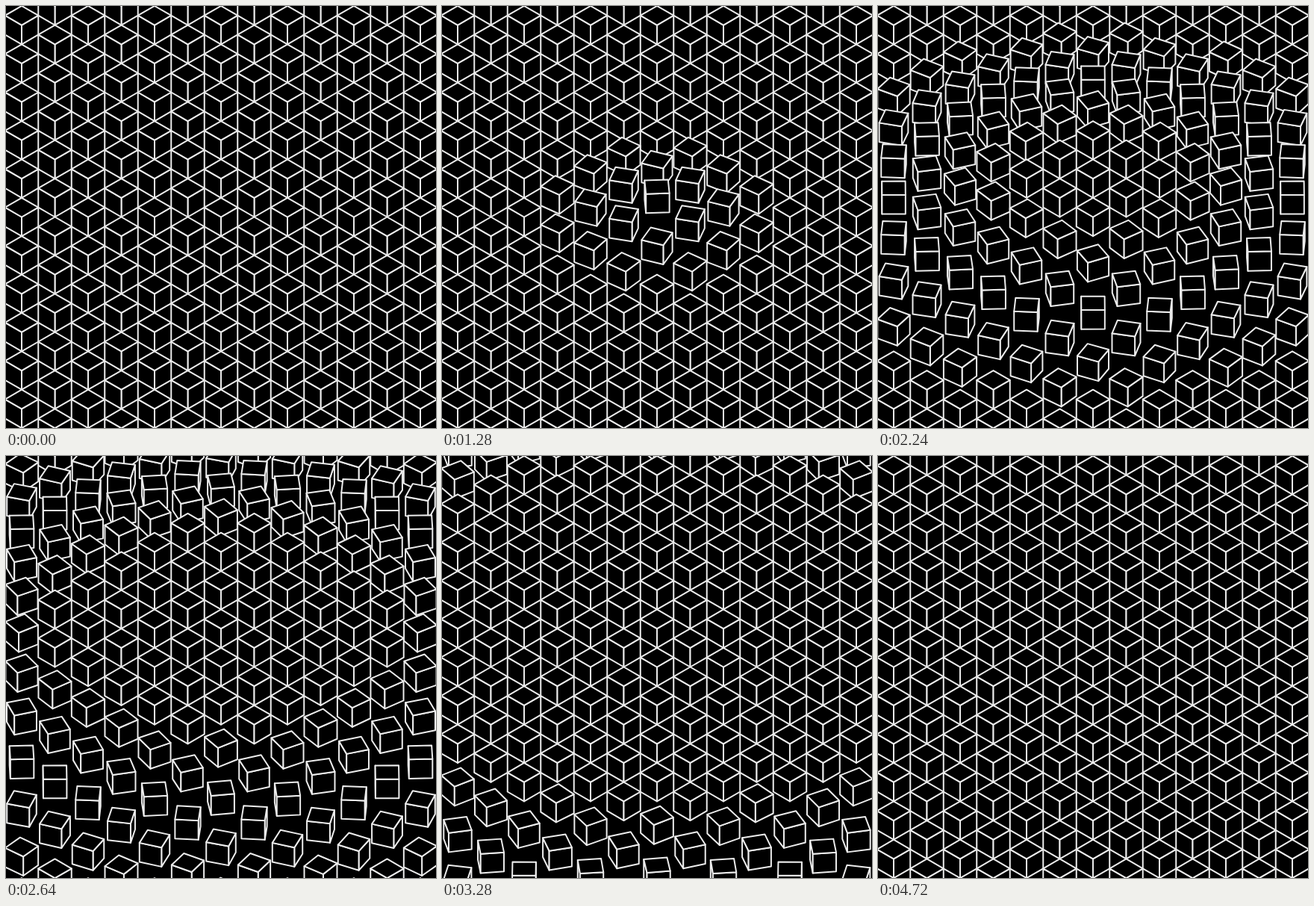
These frames come from a looping animation (576 px wide and 565 px high, 4840 ms). An HTML page with a canvas:

```html
<!DOCTYPE html>
<html lang="en">
<head>
<meta charset="utf-8">
<title>Cube wave</title>
<style>
  html, body { margin: 0; width: 100%; height: 100%; overflow: hidden; background: #000; }
  canvas { display: block; }
</style>
</head>
<body>
<canvas id="stage" width="576" height="565"></canvas>
<script>
const W = 576, H = 565;
const LOOP = 4840, TICK = 40, SWEEP = 4800;
const R = 22.25;                    // half the width of a cube seen corner-on
const K = 1 / Math.sqrt(3);         // isometric foreshortening of the ground
const EDGE = 2 * R * K;             // drawn height of a cube
const RISE = 2 * EDGE;              // lift over a quarter turn
const REACH = 935, BAND = 305;      // travel and width of the wave

const ctx = document.getElementById('stage').getContext('2d');
const smooth = u => u * u * (3 - 2 * u);
const clamp = v => Math.max(0, Math.min(1, v));

// Cubes on a staggered lattice, back row first.
const cubes = [];
for (let row = -13; row <= 15; row++) {
  for (let col = -6; col <= 6; col++) {
    if ((row + col) % 2) continue;
    const dx = col * 2 * R, dy = row * EDGE;
    cubes.push({ x: W / 2 + dx, y: H / 2 + dy, dist: Math.hypot(dx, dy / K) });
  }
}

function face(points) {
  ctx.beginPath();
  for (const [x, y] of points) ctx.lineTo(x, y);
  ctx.closePath();
  ctx.fill();
  ctx.stroke();
}

function drawCube(x, y, turn) {
  const angles = [0, 1, 2, 3].map(i => turn + i * Math.PI / 2);
  const top = angles.map(a => [x + R * Math.sin(a), y - EDGE / 2 + R * K * Math.cos(a)]);
  angles.forEach((a, i) => {
    if (Math.cos(a + Math.PI / 4) < 1e-6) return;
    const p = top[i], q = top[(i + 1) % 4];
    face([p, q, [q[0], q[1] + EDGE], [p[0], p[1] + EDGE]]);
  });
  face(top);
}

function draw(ms) {
  const wave = REACH * smooth(clamp(ms / SWEEP));
  ctx.fillStyle = '#000';
  ctx.fillRect(0, 0, W, H);
  ctx.strokeStyle = '#ececec';
  ctx.lineWidth = 2;
  ctx.lineJoin = 'round';
  for (const c of cubes) {
    const p = clamp((wave - c.dist) / BAND);
    drawCube(c.x, c.y - p * RISE, p * Math.PI / 2);
  }
}

const start = performance.now();
let shown = -1;
function loop() {
  const t = (performance.now() - start) % LOOP;
  const ms = Math.floor(t / TICK) * TICK;
  if (ms !== shown) draw(shown = ms);
  requestAnimationFrame(loop);
}
loop();
</script>
</body>
</html>
```
